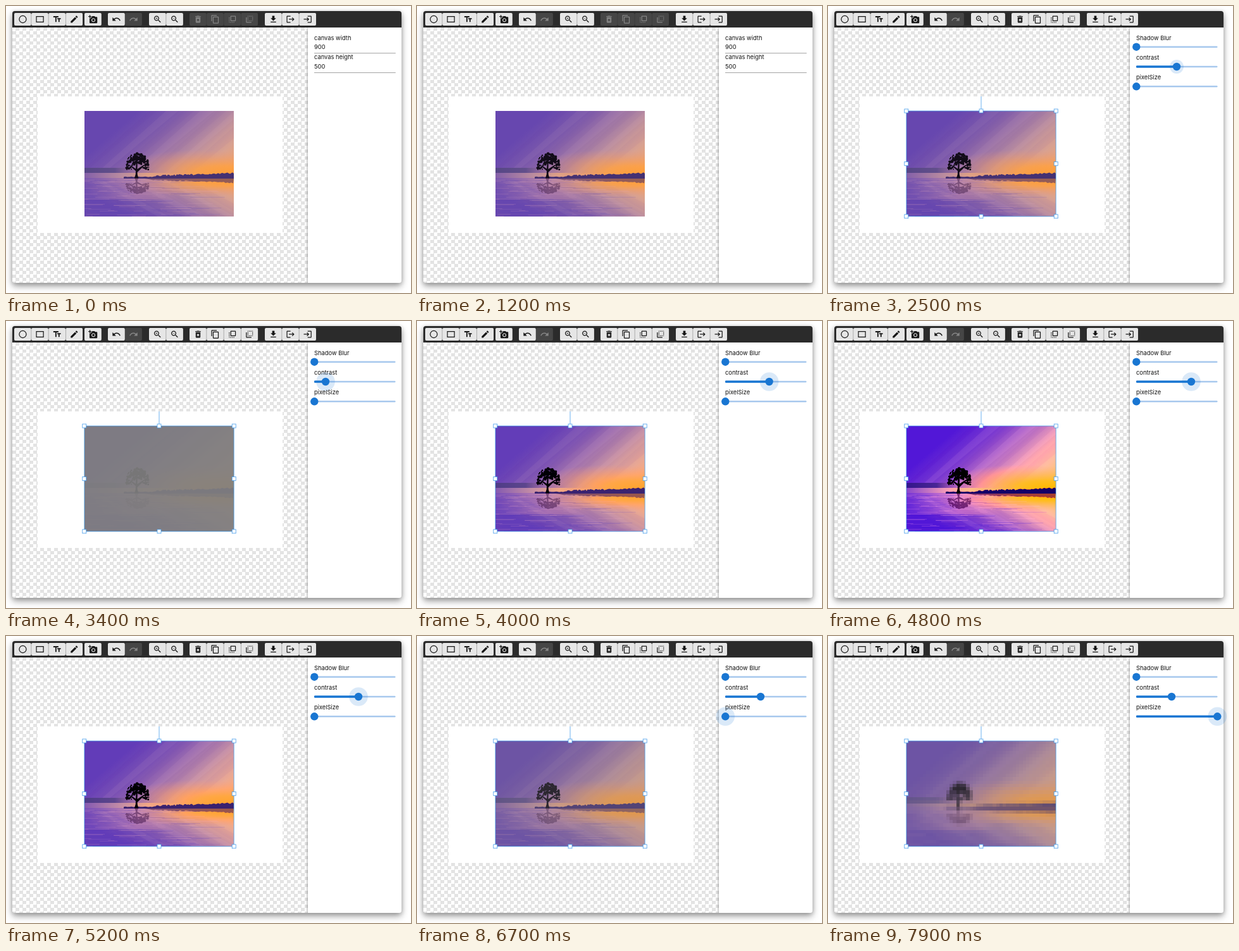
An HTML page with a canvas that plays this animation: 640 by 454 pixels, repeating every 8 s.

```html
<!DOCTYPE html>
<html lang="en">
<head>
<meta charset="utf-8">
<title>Canvas editor</title>
<style>
  html, body { margin: 0; width: 100%; height: 100%; overflow: hidden; background: #fff; }
  #stage { position: relative; width: 640px; height: 454px; overflow: hidden; }
  #stage * { position: absolute; }
  #window {
    left: 10px; top: 8px; width: 615px; height: 430px; border-radius: 4px; overflow: hidden;
    background: #fff repeating-conic-gradient(#e3e3e3 0 25%, #fff 0 50%) 0 26px / 11px 11px;
  }
  #shadow {
    left: 10px; top: 8px; width: 615px; height: 430px; border-radius: 4px;
    box-shadow: 0 5px 11px rgba(0, 0, 0, .38), 0 1px 6px rgba(0, 0, 0, .16);
  }
  #paper { left: 40px; top: 135px; width: 387px; height: 216px; background: #fff; }
  #panel { left: 467px; top: 26px; width: 148px; height: 404px; background: #fff; box-shadow: 0 0 4px rgba(0, 0, 0, .5); }
  #bar { left: 0; top: 0; width: 615px; height: 26px; background: #2b2b2b; }
  #photo { left: 124px; top: 166px; }
  #ui { left: 0; top: 0; }
  text { font: 9.35px Inter, "Liberation Sans", sans-serif; fill: #111; }
</style>
</head>
<body>
<div id="stage">
  <div id="shadow"></div>
  <div id="window">
    <div id="paper"></div>
    <div id="panel"></div>
    <div id="bar"></div>
  </div>
  <canvas id="photo" width="236" height="167"></canvas>
  <svg id="ui" width="640" height="454"></svg>
</div>
<script>
const LOOP = 8000, STEP = 100, W = 236, H = 167, HORIZON = 106;
const SELECT_AT = 1400;
const ui = document.getElementById('ui');
const photo = document.getElementById('photo');
const view = photo.getContext('2d');

function add(parent, tag, attrs, text) {
  const el = document.createElementNS('http://www.w3.org/2000/svg', tag);
  for (const key in attrs) el.setAttribute(key, attrs[key]);
  if (text) el.textContent = text;
  parent.appendChild(el);
  return el;
}

function random(seed) {
  return () => (seed = (seed * 16807) % 2147483647) / 2147483647;
}

/* Toolbar */
const lens = 'M15.5 14h-.79l-.28-.27C15.41 12.59 16 11.11 16 9.5 16 5.91 13.09 3 9.5 3S3 5.91 3 9.5 5.91 16 9.5 16c1.61 0 3.09-.59 4.23-1.57l.27.28v.79l5 4.99L20.49 19l-4.99-5zm-6 0C7.01 14 5 11.99 5 9.5S7.01 5 9.5 5 14 7.01 14 9.5 11.99 14 9.5 14z';
const icons = {
  circle: 'M12 2a10 10 0 1 0 0 20a10 10 0 1 0 0-20zm0 18a8 8 0 1 1 0-16a8 8 0 1 1 0 16z',
  rect: 'M2 4v16h20V4H2zm18 14H4V6h16v12z',
  text: 'M2.5 4v3h5v12h3V7h5V4h-13zm19 5h-9v3h3v7h3v-7h3V9z',
  pen: 'M3 17.25V21h3.75L17.81 9.94l-3.75-3.75L3 17.25zM20.71 7.04c.39-.39.39-1.02 0-1.41l-2.34-2.34c-.39-.39-1.02-.39-1.41 0l-1.83 1.83 3.75 3.75 1.83-1.83z',
  camera: 'M3 4V1h2v3h3v2H5v3H3V6H0V4h3zm3 6V7h3V4h7l1.83 2H21c1.1 0 2 .9 2 2v12c0 1.1-.9 2-2 2H5c-1.1 0-2-.9-2-2V10h3zm7 9c2.76 0 5-2.24 5-5s-2.24-5-5-5-5 2.24-5 5 2.24 5 5 5zm-3.2-5a3.2 3.2 0 1 0 6.4 0a3.2 3.2 0 1 0-6.4 0z',
  undo: 'M12.5 8c-2.65 0-5.05.99-6.9 2.6L2 7v9h9l-3.62-3.62c1.39-1.16 3.16-1.88 5.12-1.88 3.54 0 6.55 2.31 7.6 5.5l2.37-.78C21.08 11.03 17.15 8 12.5 8z',
  redo: 'M18.4 10.6C16.55 8.99 14.15 8 11.5 8c-4.65 0-8.58 3.03-9.96 7.22L3.9 16c1.05-3.19 4.05-5.5 7.6-5.5 1.95 0 3.73.72 5.12 1.88L13 16h9V7l-3.6 3.6z',
  zoomIn: lens + 'M12 10h-2v2H9v-2H7V9h2V7h1v2h2v1z',
  zoomOut: lens + 'M7 9h5v1H7z',
  remove: 'M6 19c0 1.1.9 2 2 2h8c1.1 0 2-.9 2-2V7H6v12zm2.46-7.12l1.41-1.41L12 12.59l2.12-2.12 1.41 1.41L13.41 14l2.12 2.12-1.41 1.41L12 15.41l-2.12 2.12-1.41-1.41L10.59 14l-2.13-2.12zM15.5 4l-1-1h-5l-1 1H5v2h14V4z',
  copy: 'M16 1H4c-1.1 0-2 .9-2 2v14h2V3h12V1zm3 4H8c-1.1 0-2 .9-2 2v14c0 1.1.9 2 2 2h11c1.1 0 2-.9 2-2V7c0-1.1-.9-2-2-2zm0 16H8V7h11v14z',
  front: 'M3 13h2v-2H3v2zm0 4h2v-2H3v2zm2 4v-2H3c0 1.1.89 2 2 2zM3 9h2V7H3v2zm12 12h2v-2h-2v2zm4-18H9c-1.11 0-2 .9-2 2v10c0 1.1.89 2 2 2h10c1.1 0 2-.9 2-2V5c0-1.1-.9-2-2-2zm0 12H9V5h10v10zm-8 6h2v-2h-2v2zm-4 0h2v-2H7v2z',
  back: 'M9 7H7v2h2V7zm0 4H7v2h2v-2zm0-8c-1.11 0-2 .9-2 2h2V3zm4 12h-2v2h2v-2zm6-12v2h2c0-1.1-.9-2-2-2zm-6 0h-2v2h2V3zM9 17v-2H7c0 1.1.89 2 2 2zm10-4h2v-2h-2v2zm0-4h2V7h-2v2zm0 8c1.1 0 2-.9 2-2h-2v2zM5 7H3v12c0 1.1.89 2 2 2h12v-2H5V7zm10-2h2V3h-2v2zm0 12h2v-2h-2v2z',
  save: 'M19 9h-4V3H9v6H5l7 7 7-7zM5 18v2h14v-2H5z',
  export: 'M17 7l-1.41 1.41L18.17 11H8v2h10.17l-2.58 2.58L17 17l5-5zM4 5h8V3H4c-1.1 0-2 .9-2 2v14c0 1.1.9 2 2 2h8v-2H4V5z',
  import: 'M11 7 9.6 8.4l2.6 2.6H2v2h10.2l-2.6 2.6L11 17l5-5-5-5zm9 12h-8v2h8c1.1 0 2-.9 2-2V5c0-1.1-.9-2-2-2h-8v2h8v14z'
};

const groups = [
  [13, 'circle', 'rect', 'text', 'pen'], [124, 'camera'], [161, 'undo', 'redo'],
  [226, 'zoomIn', 'zoomOut'], [290, 'remove', 'copy', 'front', 'back'],
  [409, 'save', 'export', 'import']
];
const buttons = {};
for (const [left, ...names] of groups) {
  names.forEach((name, i) => {
    const x = left + i * 27.1;
    const box = add(ui, 'rect', { x, y: 11, width: 26.8, height: 20, rx: 2 });
    const icon = add(ui, 'path', {
      d: icons[name], 'fill-rule': 'evenodd',
      transform: `translate(${x + 6.1} 13.6) scale(.615)`
    });
    buttons[name] = on => {
      box.setAttribute('fill', on ? '#e6e6e6' : '#464646');
      icon.setAttribute('fill', on ? '#161616' : '#858585');
    };
    buttons[name](name !== 'redo');
  });
}

/* Side panel */
const sizePanel = add(ui, 'g', {});
[['canvas width', '900', 53.5], ['canvas height', '500', 84.4]].forEach(([label, value, y]) => {
  add(sizePanel, 'text', { x: 487, y }, label);
  add(sizePanel, 'text', { x: 487, y: y + 14.4 }, value);
  add(sizePanel, 'rect', { x: 487, y: y + 20.8, width: 128.7, height: .8, fill: '#8c8c8c' });
});

const imagePanel = add(ui, 'g', {});
function slider(label, y) {
  add(imagePanel, 'text', { x: 487, y: y - 11 }, label);
  const line = { x: 487, y: y - 1.2, height: 2.4, rx: 1.2 };
  add(imagePanel, 'rect', { ...line, width: 128.5, fill: '#a7c8ed' });
  const fill = add(imagePanel, 'rect', { ...line, y: y - 1.7, height: 3.4, fill: '#1976d2' });
  const halo = add(imagePanel, 'circle', { cy: y, fill: '#1976d2', 'fill-opacity': .16 });
  const thumb = add(imagePanel, 'circle', { cy: y, r: 6.2, fill: '#1976d2' });
  return (x, radius) => {
    fill.setAttribute('width', x - 487);
    halo.setAttribute('cx', x);
    halo.setAttribute('r', radius);
    thumb.setAttribute('cx', x);
  };
}
const setBlur = slider('Shadow Blur', 64.7);
const setContrast = slider('contrast', 96);
const setPixel = slider('pixelSize', 127.3);
setBlur(487.3, 0);

/* Selection frame */
const frame = add(ui, 'g', { fill: 'none', stroke: '#3c98ea', 'stroke-width': .75 });
add(frame, 'path', { d: 'M123.8 166h236.4v166.8h-236.4zM242 166V143' });
for (const y of [166, 249.5, 332.8]) {
  for (const x of [123.8, 242, 360.2]) {
    if (x === 242 && y === 249.5) continue;
    add(frame, 'rect', { x: x - 3, y: y - 3, width: 6, height: 6, fill: '#fff' });
  }
}

/* Landscape */
function gradient(ctx, coords, stops) {
  const g = coords.length === 4 ? ctx.createLinearGradient(...coords) : ctx.createRadialGradient(...coords);
  stops.forEach(([at, color]) => g.addColorStop(at, color));
  return g;
}

function treePath() {
  const rnd = random(77);
  const tree = new Path2D('M79 106.5L80.8 100L81 95L72 87L73 86L81 91.5L82 76L84 76L83.5 92L94 85L95 86L83.5 97L83.8 101L85.5 106.5z');
  const leaf = (x, y, r) => {
    tree.moveTo(x + r, y);
    tree.arc(x, y, r, 0, 7);
  };
  // dome of leaves
  for (let i = 0; i < 110; i++) {
    const a = Math.PI * (1 + rnd()), d = Math.sqrt(.06 + .94 * rnd());
    leaf(83.5 + Math.cos(a) * 18.5 * d, 86 + Math.sin(a) * 18.5 * d, .9 + rnd() * 1.4);
  }
  // lower clumps on both sides
  for (let i = 0; i < 26; i++) {
    const side = i % 2 ? 1 : -1;
    leaf(83.5 + side * (8 + rnd() * 10), 86 + rnd() * 7, .9 + rnd());
  }
  return tree;
}

function paintScene() {
  const art = document.createElement('canvas');
  art.width = W;
  art.height = H;
  const c = art.getContext('2d'), rnd = random(19);
  const fill = (style, x, y, w, h) => { c.fillStyle = style; c.fillRect(x, y, w, h); };

  // sky
  fill(gradient(c, [36, 42, 148, 174], [
    [0, '#6747af'], [.23, '#7b58ab'], [.4, '#976fa7'], [.55, '#b085a1'],
    [.66, '#c69599'], [.78, '#d8a191'], [1, '#f5a565']
  ]), 0, 0, W, HORIZON);

  // slanted light rays
  for (let i = 0; i < 7; i++) {
    const x = -10 + i * 27, w = 7 + rnd() * 9;
    c.fillStyle = i % 2 ? 'rgba(255,210,215,.05)' : 'rgba(90,50,150,.035)';
    c.beginPath();
    c.moveTo(x, 100);
    c.lineTo(x + w, 100);
    c.lineTo(x + w * 1.5 + 114, 0);
    c.lineTo(x + 112, 0);
    c.fill();
  }

  // glow above the horizon
  c.save();
  c.beginPath();
  c.rect(0, 0, W, HORIZON);
  c.clip();
  c.translate(240, 104);
  c.rotate(.1);
  c.scale(1, .24);
  fill(gradient(c, [0, 0, 0, 0, 0, 165], [
    [0, '#ff9d33'], [.4, 'rgba(255,160,64,.8)'], [1, 'rgba(235,150,120,0)']
  ]), -260, -400, 520, 800);
  c.restore();

  // water mirrors the sky
  c.save();
  c.translate(0, HORIZON);
  c.scale(1, -1);
  c.drawImage(art, 0, 12, W, HORIZON - 12, 0, -61, W, 61);
  c.restore();
  fill(gradient(c, [0, 0, 150, 0], [
    [0, 'rgba(190,140,185,.1)'], [.55, 'rgba(215,150,170,.4)'], [1, 'rgba(230,160,140,0)']
  ]), 0, HORIZON, W, 34);
  for (let i = 0; i < 150; i++) {
    const y = 109 + Math.floor(rnd() * 58), x = rnd() * 200 - 30;
    fill(rnd() > .4 ? 'rgba(92,64,180,.17)' : 'rgba(225,165,185,.17)', x, y, 10 + rnd() * 45, 1);
  }

  // distant bank and haze on the left
  fill(gradient(c, [0, 0, 120, 0], [
    [0, '#564686'], [.4, '#624f8b'], [.6, 'rgba(140,100,145,.45)'], [1, 'rgba(200,140,150,0)']
  ]), 0, 90, 120, 8);
  fill(gradient(c, [0, 0, 170, 0], [
    [0, '#8460a9'], [.35, '#bb8c9f'], [.6, '#e0a183'], [1, 'rgba(255,165,90,0)']
  ]), 0, 98, 170, 8);

  // far shore and its reflection
  c.beginPath();
  c.moveTo(62, HORIZON);
  for (let x = 62; x <= W; x += 2) {
    const far = x > 108;
    c.lineTo(x, 105 - (far ? 1 + (x - 108) / 28 : .3) - rnd() * (far ? 2.6 : 1));
  }
  c.lineTo(W, 107);
  c.lineTo(62, 107);
  c.fillStyle = '#453172';
  c.fill();
  c.beginPath();
  c.moveTo(95, 107);
  for (let x = 100; x <= W; x += 3) c.lineTo(x, 107.5 + (x - 100) / 26 + rnd() * 2);
  c.lineTo(W, 107);
  c.fillStyle = 'rgba(92,58,100,.65)';
  c.fill();

  const tree = treePath();
  c.save();
  c.translate(0, 172);
  c.scale(1, -.62);
  c.fillStyle = 'rgba(85,48,90,.58)';
  c.fill(tree);
  c.restore();
  c.fillStyle = '#120c18';
  c.fill(tree);
  return art;
}

const art = paintScene();
const small = document.createElement('canvas');

function drawPhoto(block) {
  view.clearRect(0, 0, W, H);
  if (block <= 1) {
    view.drawImage(art, 0, 0);
    return;
  }
  small.width = Math.ceil(W / block);
  small.height = Math.ceil(H / block);
  const s = small.getContext('2d');
  s.imageSmoothingQuality = 'high';
  s.drawImage(art, 0, 0, small.width, small.height);
  view.imageSmoothingEnabled = false;
  view.drawImage(small, 0, 0, W, H);
}

/* Motion: [time, thumb x] and [time, halo radius] */
const contrastMove = [[2500, 551], [3400, 505], [4400, 591], [5200, 557], [5700, 543]];
const pixelMove = [[6800, 487.3], [7700, 615.3]];
const contrastHalo = [[0, 0], [2200, 11], [2600, 14.8], [5900, 0]];
const pixelHalo = [[0, 0], [6300, 11], [6600, 14.8]];

function along(keys, t) {
  if (t <= keys[0][0]) return keys[0][1];
  for (let i = 1; i < keys.length; i++) {
    const [t0, a] = keys[i - 1], [t1, b] = keys[i];
    if (t <= t1) return a + (b - a) * (t - t0) / (t1 - t0);
  }
  return keys[keys.length - 1][1];
}
const held = (keys, t) => keys.filter(k => k[0] <= t).pop()[1];

let shown = -1;
function render(t) {
  const selected = t >= SELECT_AT;
  for (const name of ['remove', 'copy', 'front', 'back']) buttons[name](selected);
  sizePanel.style.display = selected ? 'none' : '';
  imagePanel.style.display = frame.style.display = selected ? '' : 'none';

  const cx = along(contrastMove, t), px = along(pixelMove, t);
  setContrast(cx, held(contrastHalo, t));
  setPixel(px, held(pixelHalo, t));
  photo.style.filter = `contrast(${(1 + (cx - 551) / 64) ** 2})`;
  drawPhoto(1 + 4.3 * (px - 487.3) / 128);
}

const start = performance.now();
function tick() {
  const t = Math.floor((performance.now() - start) % LOOP / STEP) * STEP;
  if (t !== shown) render(shown = t);
  requestAnimationFrame(tick);
}
tick();
</script>
</body>
</html>
```
